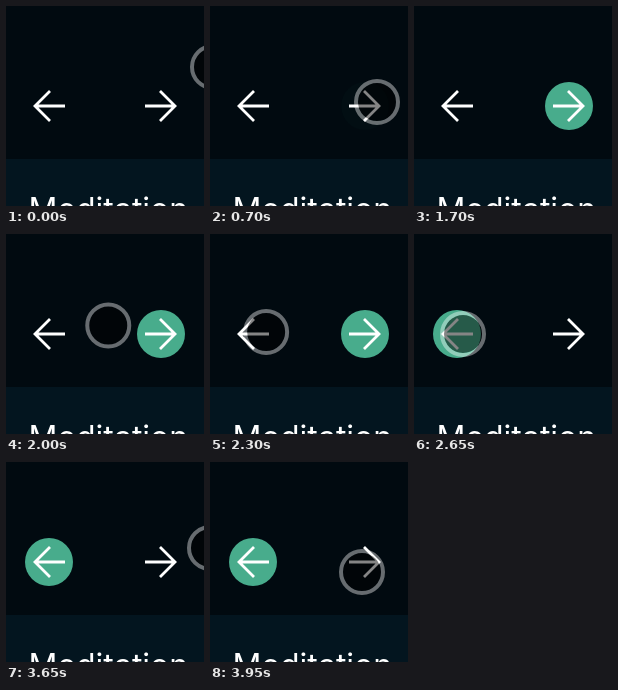
An HTML page with a canvas that plays this animation: 198 by 200 pixels, repeating every 4 s.

```html
<!DOCTYPE html>
<html lang="en">
<head>
<meta charset="utf-8">
<title>Arrow buttons</title>
<style>
  html, body { margin: 0; width: 100%; height: 100%; overflow: hidden; background: #010a10; }
  canvas { display: block; width: 198px; height: 200px; }
</style>
</head>
<body>
<canvas id="stage" width="198" height="200"></canvas>
<script>
const ctx = document.getElementById('stage').getContext('2d');
const LOOP = 4000, STEP = 50;
const LEFT = 43, RIGHT = 155, MID = 100;

const linear = p => p;
const easeIn = p => p * p;
const easeOut = p => 1 - (1 - p) ** 2;
const easeInOut = p => p * p * (3 - 2 * p);

// Cursor strokes: start, end, from, to, easing. It rests after each one.
const strokes = [
  [0, 200, [207, 61], [167, 96], easeOut],
  [1100, 1650, [167, 96], [223, 76], easeInOut],
  [1700, 2150, [223, 76], [60, 97], easeInOut],
  [2200, 2450, [60, 97], [49, 100], easeInOut],
  [2750, 2950, [49, 100], [225, 64], easeIn],
  [3600, 3650, [225, 74], [204, 86], linear],
  [3650, 3950, [204, 86], [152, 110], easeOut]
];

const progress = (t, from, to) => Math.min(1, Math.max(0, (t - from) / (to - from)));

function cursorAt(t) {
  const [start, end, a, b, ease] = strokes.filter(s => s[0] <= t).pop();
  const p = ease(progress(t, start, end));
  return a.map((v, i) => v + (b[i] - v) * p);
}

function disc(x, y, r, color, alpha = 1) {
  ctx.globalAlpha = alpha;
  ctx.fillStyle = color;
  ctx.beginPath();
  ctx.arc(x, y, r, 0, Math.PI * 2);
  ctx.fill();
  ctx.globalAlpha = 1;
}

function arrow(x, dir) {
  const tip = x + 14 * dir;
  const barb = x - dir;
  ctx.strokeStyle = '#fff';
  ctx.lineWidth = 2.8;
  ctx.beginPath();
  ctx.moveTo(x - 16 * dir, MID);
  ctx.lineTo(tip, MID);
  ctx.moveTo(barb, MID - 15);
  ctx.lineTo(tip, MID);
  ctx.lineTo(barb, MID + 15);
  ctx.stroke();
}

function cursor(x, y) {
  disc(x, y, 19, 'rgba(0, 0, 0, 0.48)');
  ctx.strokeStyle = 'rgba(255, 255, 255, 0.4)';
  ctx.lineWidth = 4;
  ctx.beginPath();
  ctx.arc(x, y, 21, 0, Math.PI * 2);
  ctx.stroke();
}

function draw(t) {
  ctx.fillStyle = '#010a10';
  ctx.fillRect(0, 0, 198, 200);
  ctx.fillStyle = '#03151f';
  ctx.fillRect(0, 153, 198, 47);

  ctx.fillStyle = '#fff';
  ctx.font = '32px Inter, sans-serif';
  ctx.textAlign = 'center';
  ctx.fillText('Meditation', 102.3, 215);

  const swap = easeInOut(progress(t, 2350, 2650));
  const rightOn = easeInOut(progress(t, 670, 1000)) * (1 - swap);
  disc(LEFT, MID, 24, '#48ac8c', swap);
  disc(RIGHT, MID, 24, '#48ac8c', rightOn);
  arrow(LEFT, -1);
  arrow(RIGHT, 1);
  cursor(...cursorAt(t));
}

let origin;
function frame(now) {
  origin ??= now;
  const t = (now - origin + 1) % LOOP;
  draw(Math.floor(t / STEP) * STEP);
  requestAnimationFrame(frame);
}
draw(0);
requestAnimationFrame(frame);
</script>
</body>
</html>
```
